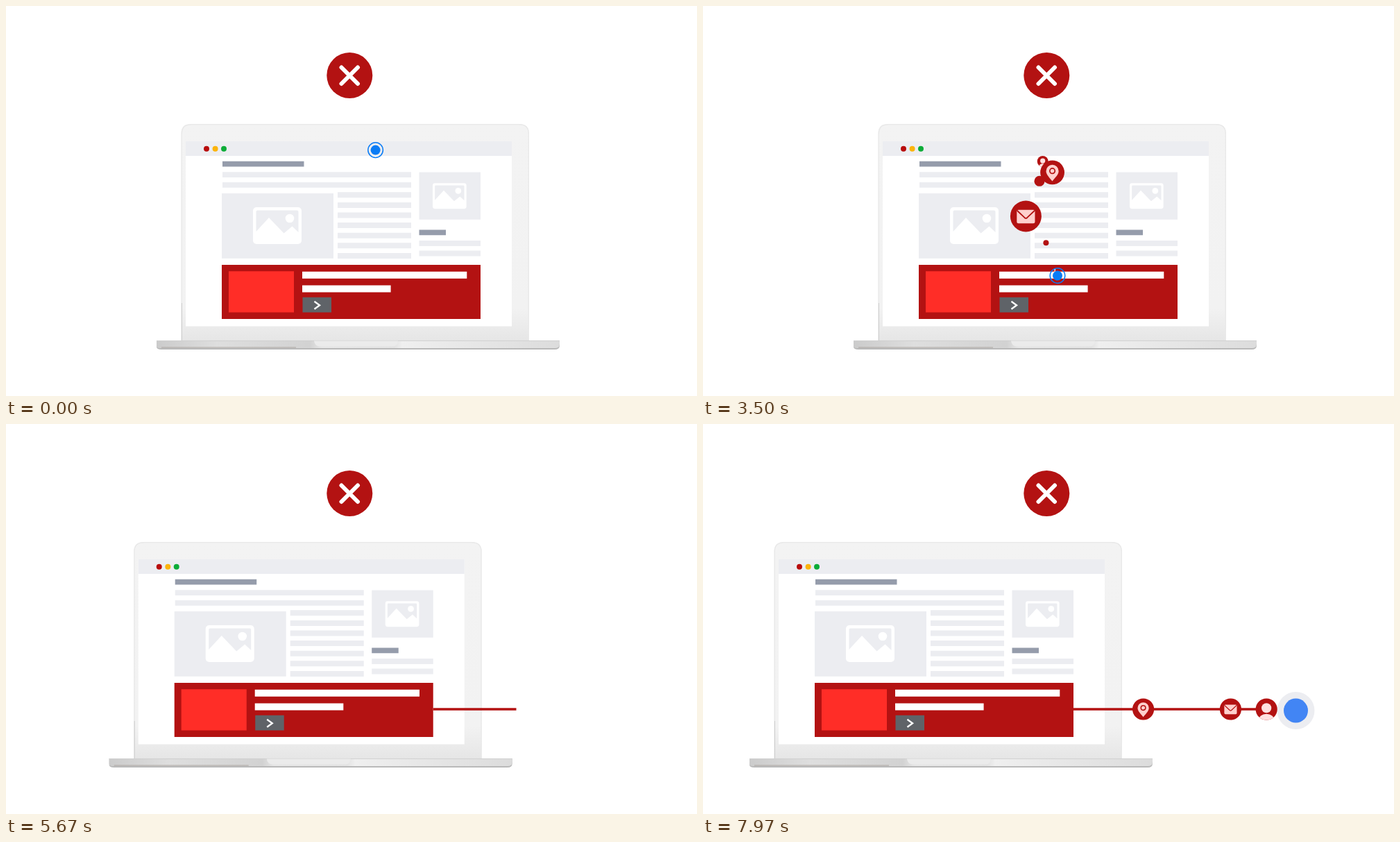
Animation of 996 by 562 pixels, one loop 8000 ms. Source, as an HTML page:

```html
<!DOCTYPE html>
<html lang="en">
<head>
<meta charset="utf-8">
<title>Data collection</title>
<style>
  html, body { margin: 0; width: 100%; height: 100%; overflow: hidden; background: #fff; }
  svg { display: block; width: 996px; height: 562px; }
</style>
</head>
<body>
<svg viewBox="0 0 996 562">
  <defs>
    <linearGradient id="lid" x1="0" y1="0" x2="0" y2="1">
      <stop offset="0" stop-color="#f3f3f3"/><stop offset=".85" stop-color="#f2f2f2"/><stop offset="1" stop-color="#e6e6e6"/>
    </linearGradient>
    <linearGradient id="base">
      <stop offset="0" stop-color="#cbcbcb"/><stop offset=".15" stop-color="#dedede"/>
      <stop offset=".38" stop-color="#d2d2d2"/><stop offset=".41" stop-color="#e6e6e6"/>
      <stop offset=".59" stop-color="#e2e2e2"/><stop offset=".61" stop-color="#efefef"/><stop offset="1" stop-color="#dcdcdc"/>
    </linearGradient>
    <clipPath id="disc"><circle r="16"/></clipPath>
    <g id="photo">
      <rect width="70" height="53" rx="5" fill="#fff"/>
      <path d="M4.5 6.5q0-2 2-2h57q2 0 2 2V36l-9-8.5-12 10L23 15 4.5 35z" fill="#ecedf1"/>
      <circle cx="53" cy="16" r="6.3" fill="#fff"/>
    </g>
    <g id="dot"><circle r="16" fill="#b31212"/></g>
    <g id="pin">
      <use href="#dot"/>
      <path d="M0 11.6C-3 7.5-8.3 3-8.3-1.8a8.3 8.3 0 0 1 16.6 0C8.3 3 3 7.5 0 11.6z" fill="#ffd0cd"/>
      <circle cy="-2" r="3.4" fill="none" stroke="#b31212" stroke-width="1.6"/>
    </g>
    <g id="mail">
      <use href="#dot"/>
      <rect x="-9.3" y="-6.6" width="18.6" height="14" rx="1.8" fill="#ffd0cd"/>
      <path d="M-9-5.8L-1.2 1.6q1.2 1 2.4 0L9-5.8" fill="none" stroke="#b31212" stroke-width="1.3"/>
    </g>
    <g id="person">
      <use href="#dot"/>
      <g fill="#ffe1e0"><circle cy="-1.8" r="7.3"/><ellipse cy="17" rx="12" ry="10.2" clip-path="url(#disc)"/></g>
    </g>
  </defs>

  <circle cx="495.3" cy="100" r="33" fill="#b31212"/>
  <path d="M483.5 88.5l23.5 23.5m0-23.5l-23.5 23.5" stroke="#fff" stroke-width="6" stroke-linecap="round"/>

  <g id="laptop">
    <path d="M252.5 482V184q0-14 14-14H740q14 0 14 14V482z" fill="url(#lid)"/>
    <path d="M253.2 482V184q0-13.3 13.3-13.3H740q13.3 0 13.3 13.3V482" fill="none" stroke="#e9e9e9" stroke-width="1.4"/>
    <path d="M253.5 428v54" stroke="#cfcfcf"/>
    <path d="M259 195h470v266.5H259z" fill="#fff"/>
    <path d="M217 482H798v7q0 6-7 6H224q-7 0-7-4z" fill="#b9b9b9"/>
    <path d="M217 482H798v5q0 6-7 6H222q-5 0-5-3z" fill="url(#base)"/>
    <path d="M217 482.4H798" stroke="#d0d0d0"/>
    <path d="M224 492H418" stroke="#aaa49f"/>
    <path d="M444 482.5q1 8 9 8H558q6 0 7-8" fill="#ebebeb"/>
    <path fill="#ecedf1" d="M259 195h470v21H259zM312 239.3h272v7.8H312zM312 254h272v7.8H312zM311 270h161v93.7H311zM595.5 239.5H684v68.2h-88.5zM595.5 338H684v8h-88.5zM595.5 352.5H684v8h-88.5z"/>
    <path d="M531 268.3v95.6" stroke="#ecedf1" stroke-width="106" stroke-dasharray="8 6.6"/>
    <path fill="#959cab" d="M312 223.7h117.5v7.8H312zM595.5 322.5H634v7.8h-38.5z"/>
    <circle cx="289" cy="205.8" r="4" fill="#b80c0c"/>
    <circle cx="301.6" cy="205.8" r="4" fill="#fbb40c"/>
    <circle cx="314" cy="205.8" r="4" fill="#0cac38"/>
    <use href="#photo" x="356" y="290"/>
    <use href="#photo" transform="translate(615 255.3) scale(.695)"/>
    <path fill="#b31212" d="M311 373h373v78H311z"/>
    <path fill="#ff2d27" d="M321 382.3h94v59.2h-94z"/>
    <path fill="#fff" d="M427 382.8h237.3v10H427zM427 402.5h127.6v10H427z"/>
    <path fill="#5f6368" d="M427.5 419.8H469v21.7h-41.5z"/>
    <path d="M444.5 425.8l7.6 5.4-7.6 5.6" fill="none" stroke="#fff" stroke-width="2.3"/>
  </g>

  <g fill="none" stroke="#b31212" stroke-width="3.4">
    <path id="line"/>
    <path id="head"/>
  </g>
  <g id="badge">
    <circle r="27" fill="#ecedf1"/>
    <circle r="17.5" fill="#4285f4"/>
  </g>
  <g id="icons"></g>
  <g id="cursor">
    <circle id="ring" r="10.8" fill="none" stroke="#0a7cf5" stroke-width="1.5"/>
    <circle id="core" r="7" fill="#0a7cf5"/>
  </g>
</svg>
<script>
const LOOP = 8000;
const $ = id => document.getElementById(id);
const clamp = v => Math.max(0, Math.min(1, v));
const phase = (t, from, to) => clamp((t - from) / (to - from));
const ease = p => (1 - Math.cos(Math.PI * p)) / 2;
const place = (el, x, y, scale = 1) => {
  el.setAttribute('transform', `translate(${x} ${y}) scale(${scale})`);
  el.style.display = scale > 0.001 ? '' : 'none';
};
const icon = kind => {
  const el = document.createElementNS('http://www.w3.org/2000/svg', 'use');
  el.setAttribute('href', '#' + kind);
  return $('icons').appendChild(el);
};

// kind, start, sideways drift, radius
const risers = [
  ['mail', 2140, -40, 20], ['dot', 2260, 4, 6], ['pin', 2400, -14, 19],
  ['person', 2601, -29, 17.5], ['pin', 2766, -8, 21], ['dot', 2858, -26.5, 7.5],
  ['mail', 3134, -49, 22.5], ['dot', 3304, -22.7, 5.6], ['person', 3465, -12, 20]
].map(([kind, start, drift, r]) => ({ el: icon(kind), start, drift, r }));

// kind, offset from the cursor, radius
const sinkers = [['person', -22, -9, 27.5], ['pin', -9.5, 27, 15]]
  .map(([kind, dx, dy, r]) => ({ el: icon(kind), dx, dy, r }));

const packets = [
  ['pin', 7060], ['mail', 7200], ['person', 7434], ['mail', 7525], ['pin', 7710]
].map(([kind, start]) => ({ el: icon(kind), start }));

function drawCursor(t) {
  const u = ease(phase(t, 190, 1500)), v = 1 - u;
  const x = 532.6 * v * v + 2 * u * v * 543 + 511 * u * u;
  place($('cursor'), x, 207.6 + 181 * u, 1 - ease(phase(t, 5180, 5430)));
  const click = Math.sin(Math.PI * phase(t, 1550, 1910));
  $('core').setAttribute('r', 7 + 2 * click);
  $('ring').setAttribute('r', 10.8 + click);
}

function drawIcons(t) {
  for (const { el, start, drift, r } of risers) {
    const p = phase(t, start, start + 1100);
    const size = Math.min(1, p / 0.25, (1 - p) / 0.4);
    const x = 511 + drift * Math.sqrt(Math.max(0, Math.sin(Math.PI * p)));
    place(el, x, 389 - 172 * Math.sin(p * Math.PI / 2), size * r / 16);
  }
  const k = Math.sin(Math.PI * phase(t, 4050, 5150));
  for (const { el, dx, dy, r } of sinkers) place(el, 511 + dx * k, 389 + dy * k, k * r / 16);
  for (const { el, start } of packets) {
    const p = phase(t, start, start + 707);
    const size = p < 1 ? Math.min(1, p / 0.2) : 0;
    place(el, 540 + 315 * ease(p), 411, size * 15.6 / 16);
  }
}

function drawArrow(t) {
  const shift = -150 * ease(phase(t, 5440, 5930));
  place($('laptop'), shift, 0);
  const rest = 1 - phase(t, 5440, 6420);
  const from = 684 + shift, tip = from + 288 * (1 - rest * rest);
  $('line').setAttribute('d', t > 5440 ? `M${from} 411H${tip}` : '');
  const h = ease(phase(t, 6300, 6560));
  $('head').setAttribute('d', h ? `M${tip - 15 * h} ${411.2 - 12.5 * h}L${tip} 411.2L${tip - 15 * h} ${411.2 + 12.5 * h}` : '');
  place($('badge'), 854.5, 413, ease(phase(t, 6300, 6660)));
}

function frame() {
  const t = performance.now() % LOOP;
  drawCursor(t);
  drawIcons(t);
  drawArrow(t);
  requestAnimationFrame(frame);
}
frame();
</script>
</body>
</html>
```
